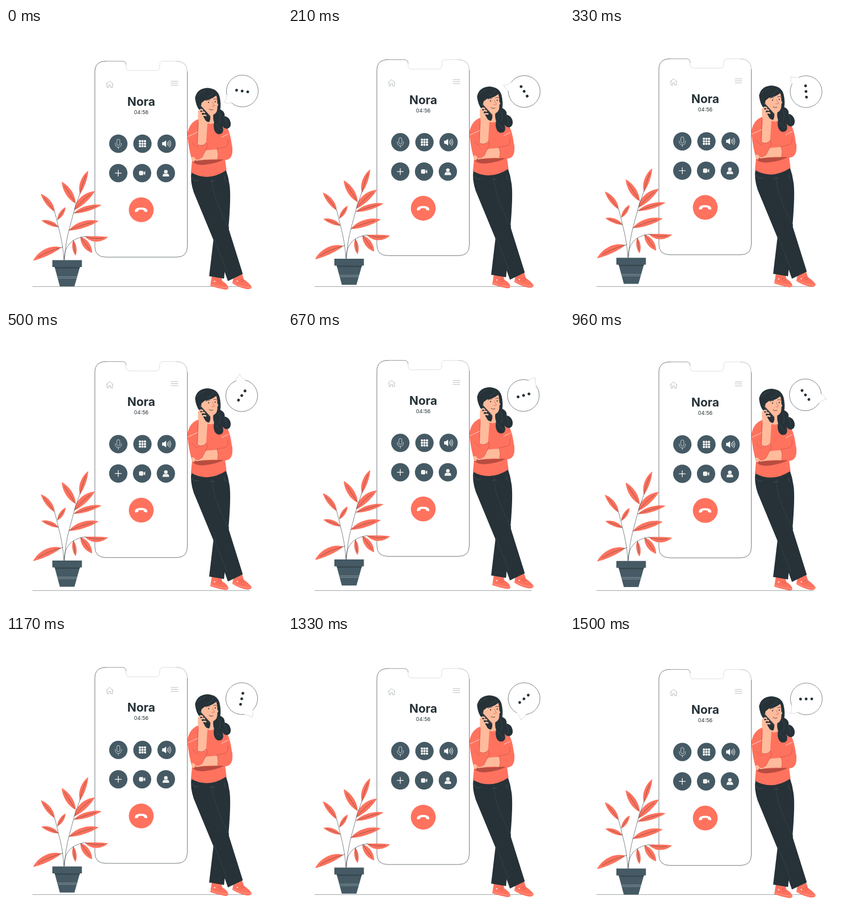
These frames come from a looping animation (500 px wide and 500 px high, 1.54 s). An HTML page with a canvas:

```html
<!DOCTYPE html>
<html lang="en">
<head>
<meta charset="utf-8">
<title>Phone call</title>
<style>
html, body { margin: 0; width: 100%; height: 100%; overflow: hidden; background: #fff; }
canvas { display: block; width: 500px; height: 500px; }
</style>
</head>
<body>
<canvas id="stage"></canvas>
<script>
const LOOP = 1540, RISE = 10;
const CORAL = '#ff725e', DARK = '#263238', SLATE = '#455a64', SKIN = '#ffbb9c', SHADE = '#b84c40', WHITE = '#fff';
const canvas = document.getElementById('stage');
const ctx = canvas.getContext('2d');
const ratio = window.devicePixelRatio || 1;
canvas.width = canvas.height = 500 * ratio;

function fill(path, color) {
  ctx.fillStyle = color;
  ctx.fill(new Path2D(path));
}

function line(path, color = DARK, width = 0.7) {
  ctx.strokeStyle = color;
  ctx.lineWidth = width;
  ctx.lineCap = ctx.lineJoin = 'round';
  ctx.stroke(new Path2D(path));
}

function disc(x, y, r, color) {
  ctx.fillStyle = color;
  ctx.beginPath();
  ctx.arc(x, y, r, 0, Math.PI * 2);
  ctx.fill();
}

function box(x, y, w, h, r, color) {
  ctx.fillStyle = color;
  ctx.beginPath();
  ctx.roundRect(x, y, w, h, r);
  ctx.fill();
}

function label(text, y, font) {
  ctx.font = font;
  ctx.textAlign = 'center';
  ctx.fillStyle = DARK;
  ctx.fillText(text, 245, y);
}

// Icons are drawn around their own centre
const icons = {
  mic() {
    line('M-2.7-5.5a2.7 2.7 0 0 1 5.4 0v6a2.7 2.7 0 0 1-5.4 0Z M-5.5-1v2a5.5 5.5 0 0 0 11 0v-2 M0 6.5V9.5', WHITE, 0.7);
  },
  keypad() {
    for (let i = 0; i < 9; i++) box(-6.5 + (i % 3) * 4.6, -6.5 + Math.floor(i / 3) * 4.6, 3.8, 3.8, 1.3, WHITE);
  },
  speaker() {
    fill('M-8-2.8H-5L-0.8-6V6L-5 2.8H-8Z', WHITE);
    line('M1.5-2.6Q3 0 1.5 2.6 M3.6-4.5Q6.3 0 3.6 4.5 M5.6-6.2Q9.8 0 5.6 6.2', WHITE, 1);
  },
  plus() {
    line('M-5.6 0H5.6M0-5.6V5.6', WHITE, 1.2);
  },
  video() {
    box(-5.5, -4, 7.8, 8, 2, '#f0f0f0');
    fill('M3-1.2L5.7-3.7V3.7L3 1.2Z', '#f0f0f0');
  },
  person() {
    disc(0, -2.6, 3.3, '#f0f0f0');
    fill('M-6 6.3Q-6 1 -2 0.7Q0 2 2 0.7Q6 1 6 6.3Z', '#f0f0f0');
  },
  hangUp() {
    fill('M-11.5 2.3C-11.5-2.5-6-4-0.3-4S11-2.5 11 2.3Q11 4.5 9 4L5.5 3Q4.5 2.5 4.6 0.5Q0-1-5 0.5Q-4.8 2.5-6 3L-9.5 4Q-11.5 4.5-11.5 2.3Z', WHITE);
  }
};

function button(x, y, r, color, icon) {
  disc(x, y, r, color);
  ctx.save();
  ctx.translate(x, y);
  icons[icon]();
  ctx.restore();
}

function drawPhone() {
  line('M181 60.5H211Q217.5 60.5 217.5 67', '#666e72');
  line('M217.5 67V70Q217.5 77.5 224 77.5H272Q278.5 77.5 278.5 70V67Q278.5 60.5 285 60.5H309', '#c4cacc', 0.6);
  line('M309 60.5Q328.5 60.5 328.5 80', '#8b9396', 0.6);
  line('M328.5 80V396Q328.5 415.5 309 415.5H181Q161 415.5 161 396V80Q161 60.5 181 60.5', '#4d575c', 0.8);
  line('M181.5 102L187.5 96.5L193.5 102M183 101V108H186V104H189.5V108H193V101', '#899195', 0.6);
  line('M299 96.8H311.5M299 100.3H311.5M299 104H311.5', '#899195', 0.6);
  label('Nora', 141, '700 21.5px Inter, sans-serif');
  label('04:56', 156, '400 9.5px Inter, sans-serif');
  ['mic', 'keypad', 'speaker'].forEach((icon, i) => button(203.5 + 43.7 * i, 210, 16.6, SLATE, icon));
  ['plus', 'video', 'person'].forEach((icon, i) => button(203.4 + 43.1 * i, 263.2, 16.6, SLATE, icon));
  button(245, 329.7, 22.5, CORAL, 'hangUp');
}

// Base, tip, and bulge on either side of the vein
function leaf([x0, y0, x1, y1, a, b]) {
  const dx = x1 - x0, dy = y1 - y0, len = Math.hypot(dx, dy);
  const at = (u, v) => [x0 + dx * u - dy / len * v, y0 + dy * u + dx / len * v];
  ctx.beginPath();
  ctx.moveTo(x0, y0);
  ctx.bezierCurveTo(...at(0.25, a), ...at(0.7, a), x1, y1);
  ctx.bezierCurveTo(...at(0.7, -b), ...at(0.25, -b), x0, y0);
  ctx.fillStyle = CORAL;
  ctx.fill();
  line(`M${x0} ${y0}Q${at(0.45, (a - b) / 2)} ${at(0.8, (a - b) / 5)}`, DARK, 0.5);
}

const leaves = [
  [134, 301, 149, 259, 4, 9], [126, 318, 101, 279, 8, 8], [124, 330, 161, 296, 5, 12],
  [123, 336, 173, 321, 5, 8], [88, 333, 63, 301, 8, 5], [93, 348, 108, 325, 5, 5],
  [95, 361, 64, 349, 7, 4], [114, 367, 168, 350, 5, 11], [143, 378, 185, 379, 12, 1],
  [135, 379, 156, 408, 8, 8], [122, 385, 126, 413, 5, 5], [100, 398, 49, 422, 13, 4]
];

function drawPlant() {
  leaves.forEach(leaf);
  line('M105 421Q103 390 95 361Q92 347 88 333', DARK, 0.6);
  line('M106 421Q107 392 115 363L126 322Q131 310 134 300', DARK, 0.6);
  line('M105 420Q106 383 143 378M100 398L103 397', DARK, 0.6);
  fill('M88 433H134L124 468.3H97.5Z', SLATE);
  fill('M88 433H134L133 436H89Z', '#37474f');
  fill('M84 421H137.5V433.5H84Z', SLATE);
  line('M92.5 451H129M94 453.7H128', '#a5b1b6', 0.7);
}

function drawLegs() {
  fill('M373 449L390 451L392 459Q401 464 403 471Q403 474.5 397 474.5Q383 472 370 467.5Z', CORAL);
  fill('M412 452L427 444L431 456Q440 462 445 469Q445 474 436 473.5Q422 471 410 463Z', CORAL);
  line('M371 465Q386 470.5 402.5 471.5M412 461.5Q425 470 444 470.5', '#ffc0b5', 0.6);
  line('M383 460L388 457.5M386 463L391 460.5M423 458L429 455M426 461L432 458', SHADE, 0.7);
  disc(378, 459.5, 1.1, WHITE);
  disc(419, 459, 1.1, WHITE);
  fill('M377 374L368 450L395 454.5L404 360Z', DARK);
  fill('M336 260Q333 277 340 298L376 385L402 459L429 446L403 363Q408 305 405 285Q403 270 398 256Z', DARK);
  line('M337 271Q340 279 349 276M378 278Q374 275 369 279M396 270Q394 276 399 278', '#536168', 0.6);
  line('M373 274Q375 309 403 361M377 382L400 441', '#425057', 0.5);
}

function drawBody() {
  fill('M362 150L379 153L380 173Q371 181 360 172Z', SKIN);
  fill('M350 165Q335 170 330 188Q327 202 337 241L335 262Q366 280 399.5 258L397 240Q411 237 410 220Q407 190 400 180L380 170Q371 178 362 171Z', CORAL);
  fill('M338 240Q360 240 396 238Q382 246 358 248.5Q344 249 338 243Z', SHADE);
  fill('M340 238L363 222L385 220L384 238.5Q364 237 345 241Z', SKIN);
  fill('M382 219L398 213L403 204L410 215Q412 238 399 239L383 238Q386 230 382 219Z', CORAL);
  line('M382 219L398 216Q404 212 402 202M383 238Q386 229 382 219', SHADE, 0.6);
  line('M391 198L403 192', '#ffd6ce', 1);
}

function drawHead() {
  fill('M342.5 127Q346 110 365 109Q383 110 387 125Q390 138 388 150L376 155L351 150Q344 142 342.5 127Z', DARK);
  fill('M378 150Q384 146 390 149Q397 153 396 160Q405 162 407 172Q408 181 401 183Q395 183 392 178Q396 188 390 192Q382 195 378 187Q375 180 377 172Q373 160 378 150Z', DARK);
  line('M385 153Q391 161 386 173M394 160Q400 168 399 176M381 175Q384 183 390 185', SLATE, 0.5);
  fill('M355 132Q373 131 381 122Q383 130 383 137Q386 140 383 142Q383 150 381 153Q377 159 371 158Q357 155 353 143Z', SKIN);
  fill('M351 138Q360 133 364 126Q375 127 383 122Q378 111 365 110Q347 114 345 132Z', DARK);
  line('M346 124Q352 117 361 114M365 126Q373 122 376 116', SLATE, 0.5);
  disc(367, 135.2, 1.1, DARK);
  disc(379, 134, 1.1, DARK);
  line('M362.5 132.2Q365.5 129.5 369 131M376 129.5Q378.5 128 381.5 129.5', DARK, 0.8);
  line('M374 134Q375 138 378 141Q376 143 373 142', SHADE, 0.6);
  line('M368 147.5Q371 150 375 148.3', DARK, 0.8);
}

function drawRaisedArm() {
  fill('M349 150Q346 160 349 169L347 214Q355 221 362 216L365 172Q368 164 363 156Z', SKIN);
  fill('M346 141Q346.5 137 350 138L370 160Q371 166 368 171Q364 171 361.5 168Z', DARK);
  line('M350 140L369 162', SLATE, 0.7);
  line('M348.5 153Q352 146 356 149.5M350.5 158Q355 150.5 359.5 153.5M352 164Q357 156 362 159', SKIN, 2.7);
  fill('M348 166Q333 171 329 190Q329 211 338 233Q346 244 355 235L365 215Q361 211 363 208Q356 216 346.5 211Z', CORAL);
  line('M348 172L346.5 211Q355 217 363 208L365 215L355 235', SHADE, 0.6);
  line('M338 208Q341 215 348 217', SHADE, 0.5);
  line('M329.5 197L347 189', '#ffd6ce', 1);
  fill('M336 235Q340 232 343 237L341 243Q335 242 336 235Z', SKIN);
}

function drawBubble(turn) {
  ctx.save();
  ctx.translate(427.2, 114.4);
  ctx.rotate(turn);
  fill('M-26.5 11Q-26 19-29 25Q-22 25-15 22Z', WHITE);
  disc(0.9, -0.3, 28.8, WHITE);
  line('M-26 10A28.8 28.8 0 1 1-15 23.7', '#4d575c', 0.7);
  line('M-26 10Q-25 19-29 25Q-22 26.5-15 23.7', '#b8bec1', 0.5);
  for (const x of [-9.6, 0.6, 10.8]) disc(x, -0.3, 2.5, DARK);
  ctx.restore();
}

function render(t) {
  ctx.setTransform(ratio, 0, 0, ratio, 0, 0);
  ctx.fillStyle = WHITE;
  ctx.fillRect(0, 0, 500, 500);
  line('M48.5 468.4H441', '#70797d', 0.7);

  const phase = ((t + 60) % LOOP) / LOOP;
  ctx.save();
  ctx.translate(0, 0.4 - RISE * (1 - Math.abs(1 - 2 * phase)));
  drawPhone();
  drawPlant();
  drawLegs();
  drawBody();
  drawHead();
  drawRaisedArm();
  ctx.restore();

  drawBubble((8 + 360 * t / LOOP) * Math.PI / 180);
}

const start = performance.now();
function tick() {
  render((performance.now() - start) % LOOP);
  requestAnimationFrame(tick);
}
tick();
</script>
</body>
</html>
```
